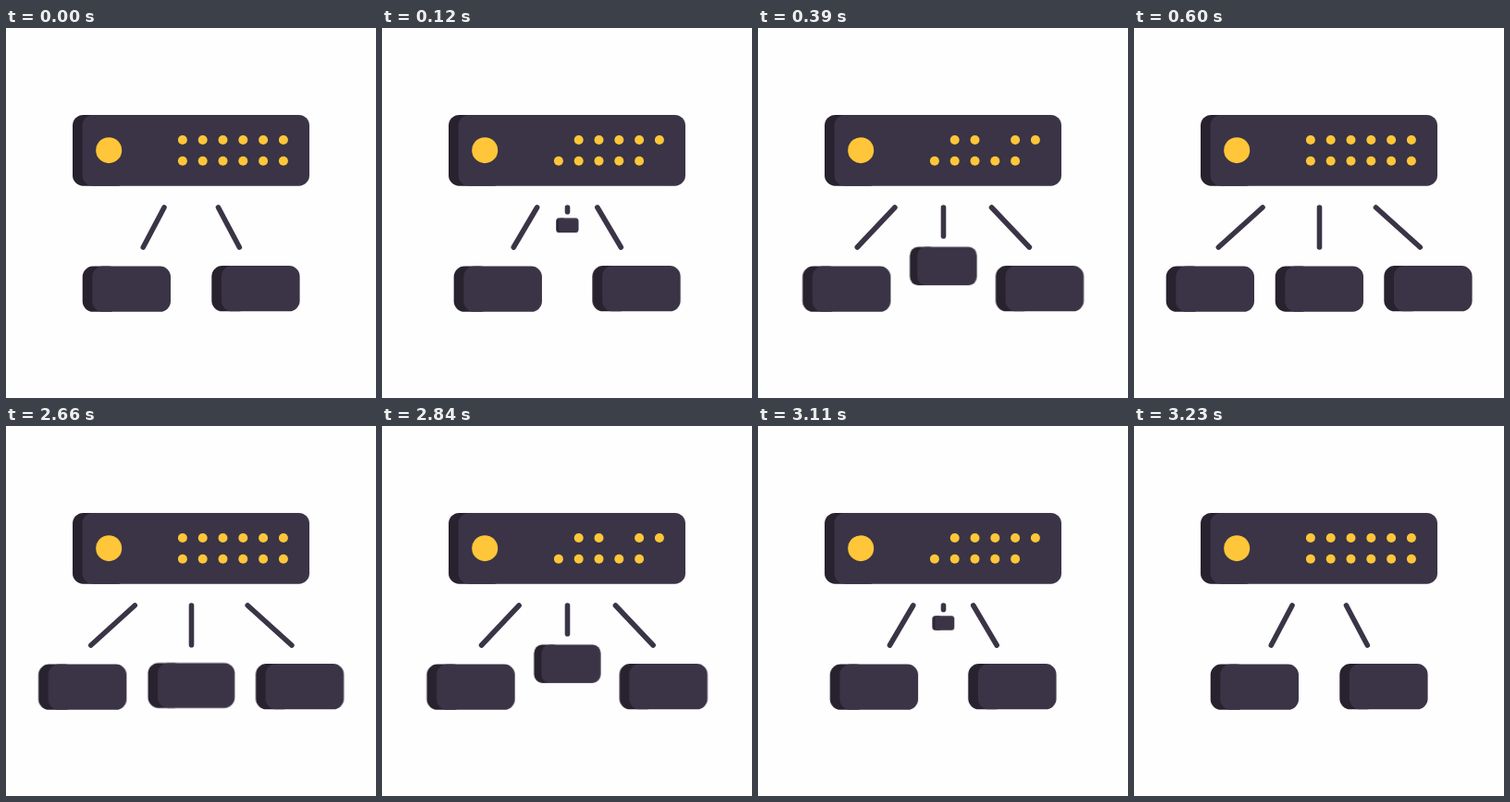
Write an HTML page without scripts that moves like this. It is 400x400 px and loops after 4.26 s.

```html
<!DOCTYPE html>
<html lang="en">
<head>
<meta charset="utf-8">
<title>Network hub</title>
<style>
  html, body { margin: 0; width: 100%; height: 100%; overflow: hidden; background: #fefefe; }
  svg { display: block; width: 100%; height: 100%; }

  .body { fill: #3a3446; }
  .side { fill: #28222f; }
  .lamp { fill: #ffc639; }
  .wire { fill: none; stroke: #3a3446; stroke-width: 5.6; stroke-linecap: round; }

  /* Opens 0-600 ms, holds, closes 2630-3230 ms, rests until 4260 ms */
  .move { animation: 4260ms cubic-bezier(.333, 0, .667, 1) infinite; }
  .blink { animation: 4260ms step-end infinite; }

  .left { animation-name: left; }
  .right { animation-name: right; }
  .wire-left { animation-name: wire-left; }
  .wire-mid { animation-name: wire-mid; }
  .wire-right { animation-name: wire-right; }
  .mid { animation-name: grow; transform-origin: 200.4px 282.1px; }
  .long { animation-name: long; }
  .short { animation-name: short; }
  .extra { animation-name: extra; }

  @keyframes left {
    0%, 75.822%, 100% { transform: none; }
    14.085%, 61.737% { transform: translateX(-48px); }
  }
  @keyframes right {
    0%, 75.822%, 100% { transform: none; }
    14.085%, 61.737% { transform: translateX(48px); }
  }
  @keyframes wire-left {
    0%, 75.822%, 100% { d: path("M171 194L148.3 237"); }
    14.085%, 61.737% { d: path("M139 194L91.4 237"); }
  }
  @keyframes wire-mid {
    0%, 75.822%, 100% { d: path("M200.5 194L200.5 194.1"); }
    14.085%, 61.737% { d: path("M200.5 194L200.5 237"); }
  }
  @keyframes wire-right {
    0%, 75.822%, 100% { d: path("M229.5 194L252.3 237"); }
    14.085%, 61.737% { d: path("M261.5 194L309.3 237"); }
  }
  @keyframes grow {
    0% { transform: translateY(-88px) scale(0, 0); animation-timing-function: linear; }
    5.634% { transform: translateY(-49.9px) scale(.506, .64); animation-timing-function: linear; }
    9.155% { transform: translateY(-24.9px) scale(.76, .845); animation-timing-function: cubic-bezier(.33, .48, .67, .9); }
    14.085% { transform: translateY(0) scale(1, 1); }
    61.737% { transform: translateY(0) scale(1, 1); animation-timing-function: cubic-bezier(.33, .1, .67, .52); }
    66.667% { transform: translateY(-24.9px) scale(.76, .845); animation-timing-function: linear; }
    70.188% { transform: translateY(-49.9px) scale(.506, .64); animation-timing-function: linear; }
    75.822%, 100% { transform: translateY(-88px) scale(0, 0); }
  }
  @keyframes long {
    0%, 12.324%, 75.469%, 100% { visibility: visible; }
    .352%, 63.498% { visibility: hidden; }
  }
  @keyframes short {
    0%, 12.324%, 68.427%, 100% { visibility: visible; }
    7.394%, 63.498% { visibility: hidden; }
  }
  @keyframes extra {
    0%, 75.469%, 100% { visibility: hidden; }
    .352% { visibility: visible; }
  }
</style>
</head>
<body>
<svg viewBox="0 0 400 400">
  <defs>
    <g id="box">
      <rect class="side" width="40" height="49.2" rx="11.5"/>
      <rect class="body" x="10.6" width="84.7" height="49.2" rx="11.5"/>
    </g>
    <circle id="dot" class="lamp" r="5"/>
  </defs>

  <rect class="side" x="72" y="94" width="60" height="76.7" rx="11.5"/>
  <rect class="body" x="82.6" y="94" width="245.4" height="76.7" rx="11.5"/>
  <circle class="lamp" cx="111.2" cy="132.2" r="14"/>

  <g transform="translate(190.9 121)">
    <use class="blink long" href="#dot"/>
    <use href="#dot" x="21.8"/>
    <use href="#dot" x="43.6"/>
    <use class="blink short" href="#dot" x="65.4"/>
    <use href="#dot" x="87.2"/>
    <use href="#dot" x="109"/>
  </g>
  <g transform="translate(190.9 143.8)">
    <use href="#dot"/>
    <use href="#dot" x="21.8"/>
    <use href="#dot" x="43.6"/>
    <use href="#dot" x="65.4"/>
    <use href="#dot" x="87.2"/>
    <use class="blink long" href="#dot" x="109"/>
  </g>

  <path class="wire move wire-left" d="M171 194L148.3 237"/>
  <path class="wire move wire-right" d="M229.5 194L252.3 237"/>
  <g class="blink extra">
    <path class="wire move wire-mid" d="M200.5 194L200.5 237"/>
    <g class="move mid"><use href="#box" x="152.7" y="257.5"/></g>
  </g>

  <g class="move left"><use href="#box" x="82.7" y="257.6"/></g>
  <g class="move right"><use href="#box" x="222.3" y="257.1"/></g>
</svg>
</body>
</html>
```
